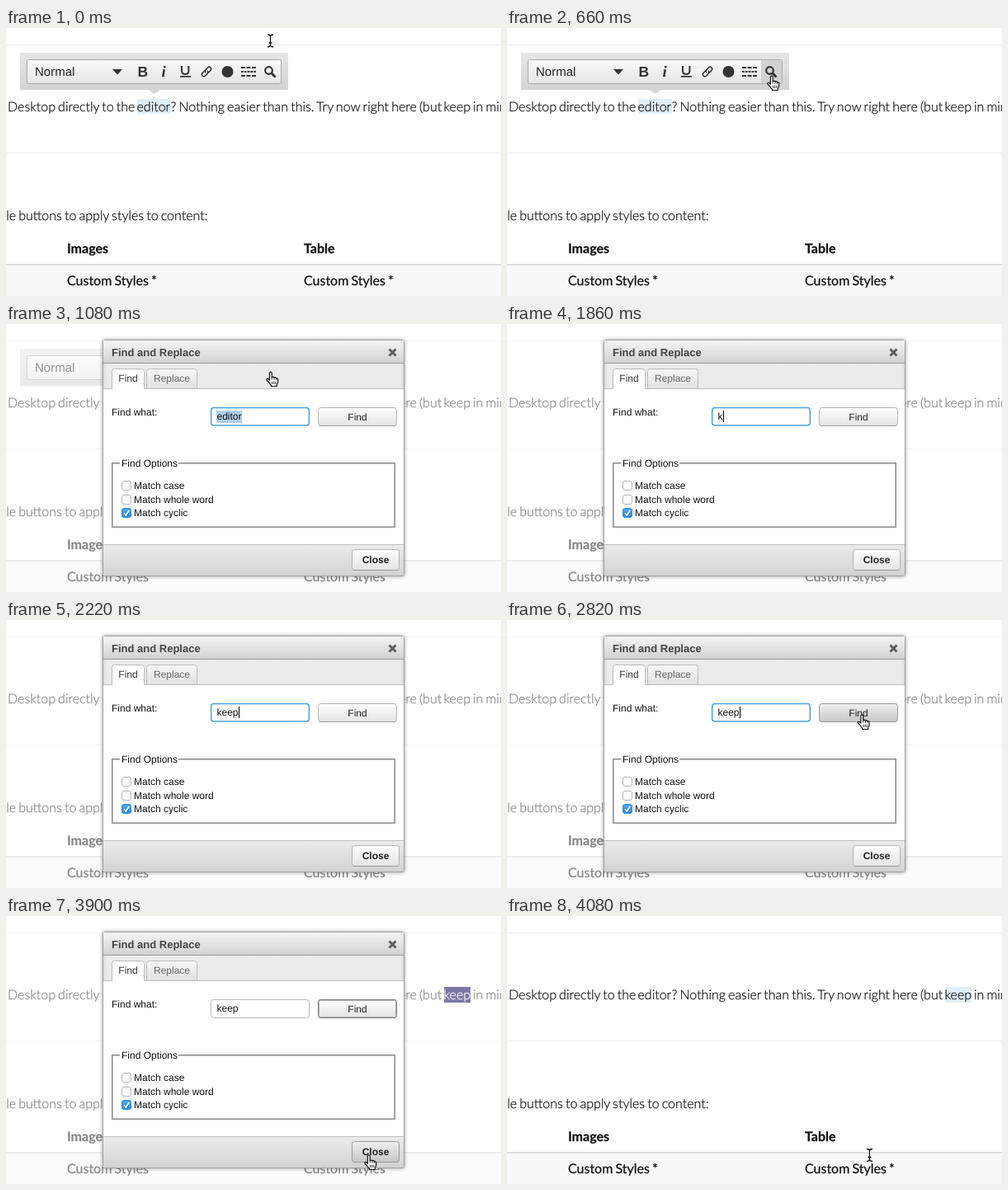
Recreate the animation shown at these times as an HTML page with a canvas. Size 600x325 px, loop 5080 ms.

```html
<!DOCTYPE html>
<html lang="en">
<head>
<meta charset="utf-8">
<title>Find and Replace</title>
<style>
html, body { margin: 0; width: 100%; height: 100%; overflow: hidden; background: #fff; }
canvas { display: block; width: 600px; height: 325px; }
</style>
</head>
<body>
<canvas id="stage"></canvas>
<script>
const W = 600, H = 325, LOOP = 5080, STEP = 60;
const SANS = '"Liberation Sans", Arial, sans-serif';
const LATO = 'Lato, sans-serif';
const LIGHT = '300 16px ' + LATO;
const SPACE = 3.1;
const canvas = document.getElementById('stage');
const ctx = canvas.getContext('2d');
const dpr = window.devicePixelRatio || 1;
canvas.width = W * dpr;
canvas.height = H * dpr;
ctx.textRendering = 'geometricPrecision';

// Times of the hard changes
const PRESS = 900, COVER = 960, OPEN = 1080, TYPE = 1860, MOVE = 2460,
      FOUND = 2940, LEAVE = 3540, CLOSE = 4020, DONE = 4080;

const FIND = [378, 101, 96, 23];
const CLOSE_BTN = [419, 273, 58, 26];

function text(str, x, y, font, color = '#222', align = 'left') {
  ctx.font = font;
  ctx.fillStyle = color;
  ctx.textAlign = align;
  ctx.fillText(str, x, y);
}

// Page text: narrow word spaces and slightly thickened strokes
function prose(str, x, y, font, color = '#111', align = 'left') {
  ctx.save();
  ctx.font = font;
  ctx.wordSpacing = SPACE - ctx.measureText(' ').width + 'px';
  text(str, x, y, font, color, align);
  ctx.strokeStyle = color;
  ctx.lineWidth = .25;
  ctx.lineJoin = 'round';
  ctx.strokeText(str, x, y);
  ctx.restore();
}

function rect(x, y, w, h, color) {
  ctx.fillStyle = color;
  ctx.fillRect(x, y, w, h);
}

function fade(y, h, top, bottom) {
  const g = ctx.createLinearGradient(0, y, 0, y + h);
  g.addColorStop(0, top);
  g.addColorStop(1, bottom);
  return g;
}

function box(x, y, w, h, r, fill, border, line = 1) {
  ctx.beginPath();
  ctx.roundRect(x + line / 2, y + line / 2, w - line, h - line, r);
  ctx.fillStyle = fill;
  ctx.fill();
  if (!border) return;
  ctx.strokeStyle = border;
  ctx.lineWidth = line;
  ctx.stroke();
}

function poly(points, color) {
  ctx.beginPath();
  points.forEach(([x, y]) => ctx.lineTo(x, y));
  ctx.closePath();
  ctx.fillStyle = color;
  ctx.fill();
}

function stroke(d, color, width) {
  ctx.strokeStyle = color;
  ctx.lineWidth = width;
  ctx.stroke(new Path2D(d));
}

function drawPage(mark) {
  rect(0, 0, W, H, '#fff');
  rect(0, 20, W, 1, '#ececec');
  rect(0, 151, W, 1, '#ececec');
  if (mark === 'editor') rect(159, 86, 41, 18, '#e0eef8');
  if (mark === 'keep') rect(531, 86, 32, 19, '#e0eef8');
  prose('Desktop directly to the', 2, 101, LIGHT);
  prose('editor', 158.5, 101, LIGHT);
  prose('? Nothing easier than this. Try now right here (but', 199.5, 101, LIGHT);
  prose('keep', 530.5, 101, LIGHT);
  prose('in mind', 566, 101, LIGHT);
  prose('configurable buttons to apply styles to content:', 244.5, 233, LIGHT, '#111', 'right');

  rect(0, 286, W, 2, '#dcdcdc');
  rect(0, 288, W, H - 288, '#f8f8f8');
  for (const [x, head] of [[74, 'Images'], [361, 'Table']]) {
    prose(head, x, 273, 'bold 16px ' + LATO);
    prose('Custom Styles *', x, 312, '16px ' + LATO);
  }
}

function drawToolbar(hover, pressed) {
  const ink = '#333';
  rect(17, 30, 325, 45, fade(30, 45, '#e6e6e6', '#d3d3d3'));
  poly([[172, 75], [187, 75], [179.5, 80]], '#d8d8d8');
  box(25, 38, 309, 30, 2, fade(38, 30, '#fafafa', '#e5e5e5'), '#aaa');
  if (hover) rect(308, 39, 25, 28, pressed ? '#c4c4c4' : '#d2d2d2');
  text('Normal', 35, 58, '15px ' + SANS, '#222');
  poly([[129, 50], [141, 50], [135, 56.5]], ink);

  text('B', 159.5, 59, 'bold 17.5px ' + SANS, ink);
  text('i', 188.5, 59, 'italic bold 19px "Liberation Serif", serif', ink);
  stroke('M213 46 v6 q0 4 4.2 4 t4.2 -4 v-6', ink, 2);
  rect(211, 58, 13, 1.7, ink);

  ctx.save();
  ctx.translate(243, 53);
  ctx.rotate(-0.8);
  ctx.lineCap = 'round';
  stroke('M-1 -2.4 h-3.6 a2.4 2.4 0 0 0 0 4.8 h3.6 q2 0 2.4 -1.8 M1 2.4 h3.6 a2.4 2.4 0 0 0 0 -4.8 h-3.6 q-2 0 -2.4 1.8', ink, 1.5);
  ctx.restore();

  ctx.beginPath();
  ctx.arc(268.5, 53, 7, 0, 7);
  ctx.fillStyle = ink;
  ctx.fill();

  for (const y of [47, 57]) for (let i = 0; i < 3; i++) rect(285 + i * 6.5, y, 5, 2, ink);
  for (let i = 0; i < 5; i++) rect(285 + i * 3.8, 52, 2.8, 2, ink);

  ctx.beginPath();
  ctx.arc(318.5, 51.5, 4.3, 0, 7);
  ctx.strokeStyle = ink;
  ctx.lineWidth = 2.2;
  ctx.stroke();
  stroke('M322 55 L326.5 59.5', ink, 3);
}

function button(label, [x, y, w, h], hover, focus, bold) {
  const fill = hover ? fade(y, h, '#f0f0f0', '#c6c6c6') : fade(y, h, '#ffffff', '#e3e3e3');
  box(x, y, w, h, 3, fill, hover ? '#999' : '#b3b3b3');
  rect(x + 2, y + h - 1, w - 4, 1, '#999');
  if (focus) {
    box(x, y, w, h, 3, 'rgba(0,0,0,0)', '#777');
    box(x + 1, y + 1, w - 2, h - 2, 2, 'rgba(0,0,0,0)', '#b5b5b5');
  }
  text(label, x + w / 2, y + h / 2 + 4, (bold ? 'bold ' : '') + '12px ' + SANS, '#222', 'center');
}

function tab(label, x, w, active) {
  ctx.beginPath();
  ctx.roundRect(x + .5, 54.5, w - 1, 24, [3, 3, 0, 0]);
  ctx.fillStyle = active ? '#fff' : fade(54, 24, '#f6f6f6', '#e2e2e2');
  ctx.fill();
  ctx.strokeStyle = '#bbb';
  ctx.lineWidth = 1;
  ctx.stroke();
  if (active) rect(x + 1, 78, w - 2, 1, '#fff');
  text(label, x + w / 2, 70, '12px ' + SANS, active ? '#333' : '#666', 'center');
}

function drawOptions() {
  ctx.lineWidth = 1;
  ctx.strokeStyle = '#8c8c8c';
  ctx.strokeRect(128.5, 168.5, 343, 78);
  ctx.strokeStyle = '#bdbdbd';
  ctx.strokeRect(129.5, 169.5, 341, 76);
  rect(138, 166, 71, 6, '#fff');
  text('Find Options', 140, 173, '12px ' + SANS, '#111');
  ['Match case', 'Match whole word', 'Match cyclic'].forEach((label, i) => {
    const y = Math.round(190 + i * 16.6), on = i === 2;
    box(140, y, 12, 12, 2.5, on ? fade(y, 12, '#55a9f5', '#2287ea') : '#fff', on ? '#2b88dd' : '#b5b5b5');
    if (on) stroke(`M143 ${y + 6.3} l2.2 2.7 l4 -6`, '#fff', 1.6);
    text(label, 155, y + 10, '12px ' + SANS, '#111');
  });
}

function drawField(value, selected, focus) {
  if (focus) {
    box(247.5, 100.5, 121, 23.5, 3.5, '#a9d3f6');
    box(248, 101, 120, 22.5, 3, '#fff', '#3a99e4', 1.3);
  } else {
    box(248, 101, 120, 23, 3, '#fff', '#b8b8b8');
  }
  const font = '12px ' + SANS;
  ctx.font = font;
  const w = ctx.measureText(value).width;
  if (selected) rect(255, 105, w + 1, 15, '#b0cfee');
  text(value, 255.5, 116, font, '#111');
  if (focus && !selected) rect(Math.round(256 + w), 105, 1, 14, '#000');
}

function drawDialog(t, over) {
  ctx.save();
  ctx.shadowColor = 'rgba(0,0,0,.35)';
  ctx.shadowBlur = 4 * dpr;
  box(117, 19, 366, 287, 2, '#ebebeb', '#a2a2a2');
  ctx.restore();
  rect(118, 20, 364, 28, fade(20, 28, '#f5f5f5', '#d0d0d0'));
  rect(118, 47, 364, 1, '#999');
  text('Find and Replace', 128, 39, 'bold 13px ' + SANS, '#444');
  stroke('M464.5 30.5 l8 8 m0 -8 l-8 8', '#5a5a5a', 2.8);

  rect(118, 79, 364, 188, '#fff');
  rect(118, 78, 364, 1, '#bfbfbf');
  tab('Find', 128, 40, true);
  tab('Replace', 170, 62, false);

  const typed = Math.floor((t - TYPE) / 120) + 1;
  const value = t < TYPE ? 'editor' : 'keep'.slice(0, typed);
  text('Find what:', 128, 111, '12px ' + SANS, '#111');
  drawField(value, t < TYPE, t < FOUND);
  button('Find', FIND, over === FIND, t >= FOUND, false);
  drawOptions();

  rect(118, 267, 364, 38, fade(267, 38, '#ececec', '#d2d2d2'));
  rect(118, 267, 364, 1, '#bfbfbf');
  button('Close', CLOSE_BTN, over === CLOSE_BTN, false, true);
}

const HAND = new Path2D('M-1.6 7.6 V1 Q-1.6 -.4 -.2 -.4 Q1.2 -.4 1.2 1 V6 Q2.8 5 4 6.4 Q5.6 5.6 6.4 7.2 Q8.6 6.8 8.6 9 V11.5 Q8.4 13.5 7.2 15 V17 H.4 V15.6 Q-1.6 14 -2.6 12 L-5.2 9.4 Q-5.4 7.4 -3.4 7.8 L-1.6 9.6 Z');
const ARROW = new Path2D('M0 0 V14.5 L3.4 11.4 L5.6 16.4 L8 15.4 L5.8 10.5 H10.4 Z');
const BEAM = 'M-3.5 -7.5 Q-.5 -7.5 0 -5.5 Q.5 -7.5 3.5 -7.5 M0 -5.5 V5.5 M-3.5 7.5 Q-.5 7.5 0 5.5 Q.5 7.5 3.5 7.5 M-2 2.5 H2';

function drawCursor({ x, y, kind }) {
  ctx.save();
  ctx.translate(x, y);
  ctx.lineJoin = 'round';
  if (kind === 'beam') {
    stroke(BEAM, '#fff', 3);
    stroke(BEAM, '#111', 1.3);
  } else if (kind === 'hand') {
    ctx.fillStyle = '#fff';
    ctx.fill(HAND);
    ctx.strokeStyle = '#111';
    ctx.lineWidth = 1.2;
    ctx.stroke(HAND);
    stroke('M1.2 6 V9 M4 6.6 V9 M6.4 7.4 V9.4 M1.6 11.4 V14.4 M3.7 11.4 V14.4 M5.8 11.4 V14.4', '#111', .9);
  } else {
    ctx.strokeStyle = '#fff';
    ctx.lineWidth = 2;
    ctx.stroke(ARROW);
    ctx.fillStyle = '#111';
    ctx.fill(ARROW);
  }
  ctx.restore();
}

const inside = (p, [x, y, w, h]) => p.x >= x && p.x < x + w && p.y >= y && p.y < y + h;

function glide(t, start, length, [x0, y0], [x1, y1]) {
  const u = Math.min(1, Math.max(0, (t - start) / length));
  const e = u * u * (3 - 2 * u);
  return { x: x0 + (x1 - x0) * e, y: y0 + (y1 - y0) * e };
}

function cursorAt(t) {
  if (t >= TYPE && t < MOVE) return null;
  let p;
  if (t < TYPE) {
    p = glide(t, 0, 480, [320.5, 15.5], [321, 58.5]);
    p.kind = p.y > 38 ? 'hand' : 'beam';
  } else if (t < CLOSE) {
    p = t < LEAVE
      ? glide(t, MOVE - STEP, 420, [321, 58.5], [430.5, 115.5])
      : glide(t, LEAVE - STEP, 420, [430.5, 115.5], [440, 290.5]);
    p.over = [FIND, CLOSE_BTN].find(b => inside(p, b));
    p.kind = p.over ? 'hand' : 'arrow';
  } else {
    p = t < DONE ? { x: 440, y: 290.5, kind: 'hand' } : { x: 439.5, y: 290, kind: 'beam' };
  }
  return p;
}

function draw(time) {
  const t = Math.floor((time % LOOP) / STEP) * STEP;
  const cursor = cursorAt(t);
  ctx.setTransform(dpr, 0, 0, dpr, 0, 0);
  drawPage(t < TYPE ? 'editor' : t >= CLOSE ? 'keep' : '');
  if (t < TYPE) drawToolbar(cursor.kind === 'hand', t >= PRESS);
  if (t >= COVER && t < CLOSE) rect(0, 0, W, H, 'rgba(255,255,255,.5)');
  if (t >= FOUND && t < CLOSE) {
    rect(531, 86, 32, 19, '#7b79a4');
    prose('keep', 530.5, 101, LIGHT, '#fff');
  }
  if (t >= OPEN && t < CLOSE) drawDialog(t, cursor && cursor.over);
  if (cursor) drawCursor(cursor);
}

const begin = performance.now();
function tick() {
  draw(performance.now() - begin);
  requestAnimationFrame(tick);
}
tick();
</script>
</body>
</html>
```
